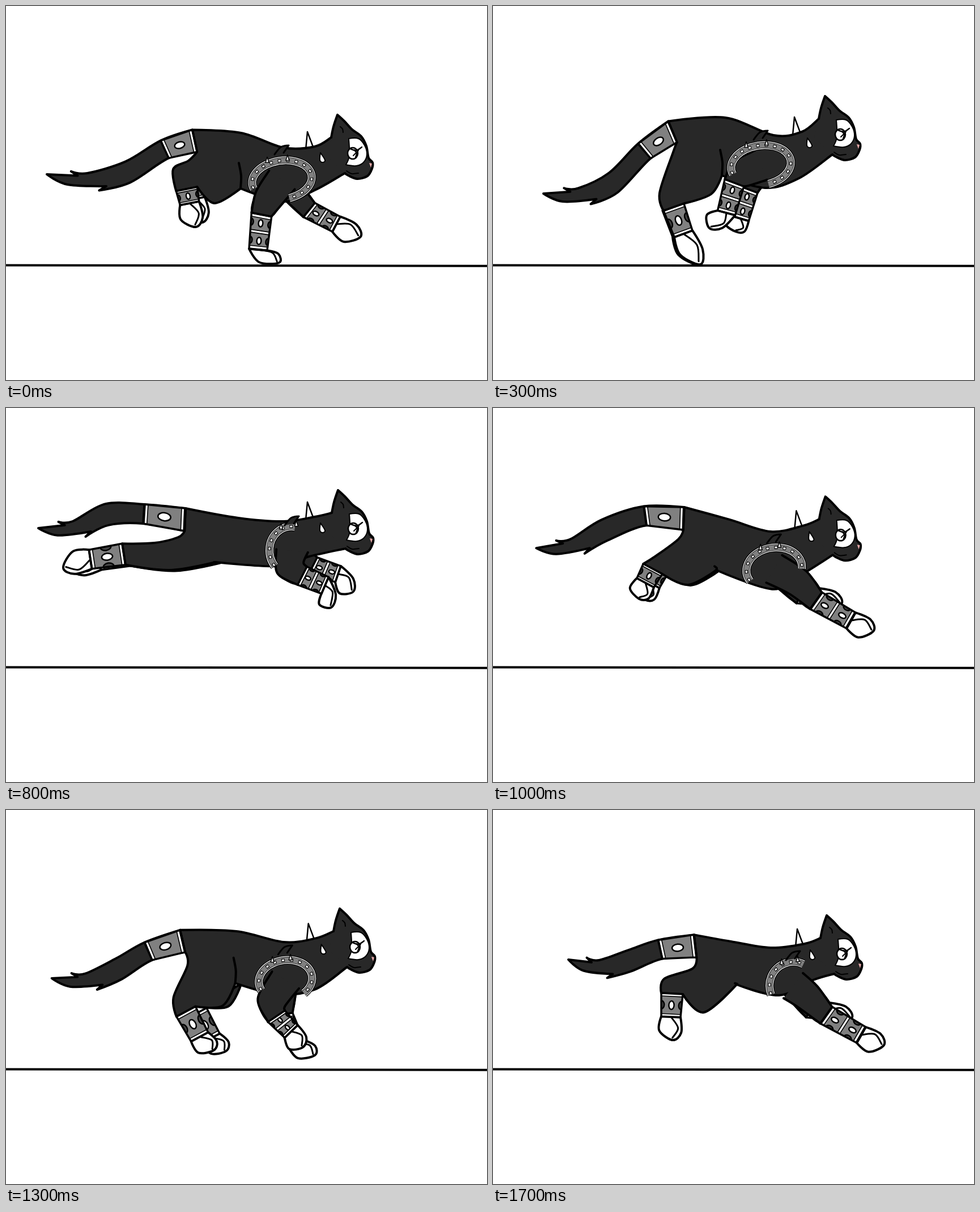
Recreate the animation shown at these times as an HTML page with a canvas. Size 849 px wide and 660 px high, loop 1.8 s.

```html
<!DOCTYPE html>
<html lang="en">
<head>
<meta charset="utf-8">
<title>Running cat</title>
<style>
html, body { margin: 0; height: 100%; overflow: hidden; background: #fff; }
canvas { display: block; }
</style>
</head>
<body>
<canvas id="stage" width="849" height="660"></canvas>
<script>
const ctx = document.getElementById('stage').getContext('2d');
const LOOP = 1800, STEP = 100;
const INK = '#000', FUR = '#282828', GREY = '#808080', WHITE = '#fff';

// Joints of each key pose; outlines grow from them.
// torso: neck, withers, loin, rump, thigh back and front, flank, belly, chest
// tail: root, cuff end, middle, tip; legs: (elbow,) cuff, ankle, toe
// gap: far hind leg from the near one; collar: centre, radii, start and end angle
const poses = [
  { t: 0, head: [0, 0], gap: [11, -8], collar: [487, 307, 53, 34, 2.9, 7.7],
    torso: [545,248, 490,250, 415,224, 322,273, 295,288, 368,348, 414,322, 490,345, 545,325],
    tail: [333,238, 280,253, 215,293, 72,297],
    nearHind: [319,323, 324,348, 335,390],
    nearFore: [463,340, 451,368, 445,430, 482,453],
    farFore: [535,360, 583,385, 626,407] },
  { t: 300, head: [1, -33], gap: [-4, 0], collar: [473, 281, 53, 35, 2.9, 7.7],
    torso: [545,222, 495,228, 410,197, 318,258, 294,330, 385,332, 404,299, 480,321, 540,304],
    tail: [317,222, 267,256, 212,312, 89,331],
    nearHind: [319,355, 336,402, 366,456],
    nearFore: [438,296, 426,312, 412,365, 382,392],
    farFore: [452,324, 437,375, 428,398] },
  { t: 600, head: [1, -42], gap: [-22, 0], collar: [495, 253, 46, 50, 2.2, 4.8],
    torso: [540,194, 490,204, 400,204, 287,262, 234,322, 325,338, 374,288, 478,295, 530,257],
    tail: [294,217, 240,233, 165,280, 40,314],
    nearHind: [241,351, 216,430, 256,454],
    nearFore: [486,270, 492,281, 528,294, 540,328],
    farFore: [519,273, 542,281, 549,296] },
  { t: 800, head: [1, -47], gap: [16, 3], collar: [505, 252, 40, 43, 2.6, 5],
    torso: [545,192, 490,200, 410,194, 304,228, 262,238, 290,286, 370,272, 478,279, 535,262],
    tail: [316,197, 243,187, 178,188, 57,212],
    nearHind: [208,258, 149,267, 101,282],
    nearFore: [502,282, 523,296, 563,313, 574,352],
    farFore: [542,278, 586,293, 613,324] },
  { t: 1100, head: [2, -30], gap: [8, 1], collar: [492, 300, 54, 35, 2.8, 7.2],
    torso: [550,215, 490,227, 420,198, 339,233, 301,272, 372,325, 406,293, 500,340, 546,312],
    tail: [347,194, 281,192, 207,229, 86,265],
    nearHind: [319,297, 329,329, 336,364],
    nearFore: [474,342, 482,384, 510,434, 546,452],
    farFore: [542,350, 596,372, 628,392] },
  { t: 1400, head: [5, -12], gap: [28, 2], collar: [494, 300, 44, 35, 2.8, 7.2],
    torso: [545,232, 490,236, 400,222, 311,295, 293,360, 387,356, 404,312, 470,318, 545,319],
    tail: [294,250, 236,278, 195,306, 78,313],
    nearHind: [317,385, 348,436, 382,454],
    nearFore: [466,338, 475,354, 500,369, 513,402],
    farFore: [464,366, 470,432, 504,453] },
  { t: 1700, head: [4, -6], gap: [0, 0], collar: [530, 310, 42, 42, 2.9, 5.3],
    torso: [550,236, 490,243, 420,232, 352,280, 302,298, 372,357, 430,308, 505,327, 565,300],
    tail: [357,240, 295,246, 241,266, 133,264],
    nearHind: [316,324, 314,365, 317,406],
    nearFore: [556,330, 588,362, 650,397, 690,415],
    farFore: [562,353, 592,355, 634,366] }
];

const pairs = list => list.flatMap((v, i) => i % 2 ? [] : [[v, list[i + 1]]]);
const add = (p, q) => [p[0] + q[0], p[1] + q[1]];
const mix = (p, q, k) => [p[0] + (q[0] - p[0]) * k, p[1] + (q[1] - p[1]) * k];
const shift = (list, d) => list.map((v, i) => v + d[i % 2]);

// The forelegs reach out once more before the second landing.
const reach = [-18, -22], last = poses[6];
poses.splice(4, 0, { t: 1000, nearFore: shift(last.nearFore, reach), farFore: shift(last.farFore, reach) });

const headLine = pairs([574,232, 578,213, 585,192, 597,203, 611,218, 627,230, 636,247, 640,268, 647,276, 646,287, 638,300, 620,305, 604,299, 598,295]);
const maskLine = pairs([605,234, 622,234, 633,246, 637,262, 631,276, 618,282, 600,280, 606,264]);
// Tufts at the tail end: fraction along middle-tip, offset upwards.
const tailEnd = [[.5, 0], [.7, 4], [.62, -4], [1, 0], [.75, -19], [.27, -24], [.36, -31]];

function sample(part, t) {
  const keys = poses.filter(p => p[part]);
  let i = keys.length - 1;
  while (keys[i].t > t) i--;
  const from = keys[i], to = keys[i + 1] || { ...keys[0], t: LOOP };
  const k = (t - from.t) / (to.t - from.t);
  return from[part].map((v, j) => v + (to[part][j] - v) * k);
}

function normal(p, q, w) {
  const dx = q[0] - p[0], dy = q[1] - p[1], k = w / (Math.hypot(dx, dy) || 1);
  return [-dy * k, dx * k];
}

const off = (p, q, k, w) => add(mix(p, q, k), normal(p, q, w));

// Both sides of a chain of joints with the given half widths.
function ribbon(chain, widths) {
  const side = sign => chain.map((p, i) =>
    add(p, normal(chain[Math.max(0, i - 1)], chain[i + 1] || p, sign * widths[i])));
  return [side(1), side(-1)];
}

function spline(pts, corners = [], closed = false) {
  const n = pts.length, path = new Path2D();
  const at = i => closed ? pts[(i + n) % n] : pts[Math.max(0, Math.min(n - 1, i))];
  const slope = i => corners.includes(i % n) ? [0, 0] : mix([0, 0], add(at(i + 1), at(i - 1).map(v => -v)), 1 / 6);
  path.moveTo(...pts[0]);
  for (let i = 0; i < (closed ? n : n - 1); i++) {
    const p = at(i), q = at(i + 1), b = slope(i + 1);
    path.bezierCurveTo(...add(p, slope(i)), q[0] - b[0], q[1] - b[1], ...q);
  }
  return path;
}

function poly(...pts) {
  const path = new Path2D();
  pts.forEach(p => path.lineTo(...p));
  path.closePath();
  return path;
}

function fill(path, color) {
  ctx.fillStyle = color;
  ctx.fill(path);
}

function line(path, width = 4, color = INK) {
  ctx.lineWidth = width;
  ctx.strokeStyle = color;
  ctx.stroke(path);
}

function shape(path, color, width = 4) {
  fill(path, color);
  line(path, width);
}

function oval([x, y], rx, ry, angle, color) {
  const path = new Path2D();
  path.ellipse(x, y, rx, ry, angle, 0, 7);
  shape(path, color, 2.5);
}

// Studded cuff between the edges a-b and c-d.
function cuff(a, b, c, d, count, sideStuds) {
  const quad = poly(a, b, d, c);
  const start = mix(a, b, .5), end = mix(c, d, .5);
  const dx = end[0] - start[0], dy = end[1] - start[1];
  const size = Math.hypot(dx, dy) / count * .12 + 2.5, angle = Math.atan2(dy, dx);
  fill(quad, GREY);
  ctx.save();
  ctx.clip(quad);
  for (let i = 0; i < count; i++) {
    const k = (i + .5) / count, left = mix(a, c, k), right = mix(b, d, k);
    oval(mix(left, right, .5), size, size * .62, angle, WHITE);
    if (sideStuds) [left, right].forEach(p => oval(p, size, size * .7, angle, '#444'));
  }
  for (let i = 0; i <= count; i++) {
    const k = .06 + .88 * i / count, stripe = poly(mix(a, c, k), mix(b, d, k));
    line(stripe, 6.5);
    line(stripe, 3.2, WHITE);
  }
  ctx.restore();
  line(quad, 3.5);
}

// A leg ends in cuff and ankle; earlier joints form the furry upper part.
function leg(chain, toe, widths, cuffs) {
  const [left, right] = ribbon(chain, widths), n = chain.length;
  const [[a, c], [b, d]] = [left.slice(-2), right.slice(-2)];
  if (n > 2) {
    const back = left.slice(0, -1), front = right.slice(0, -1);
    fill(spline([...back, ...front.reverse()]), FUR);
    line(spline(back));
    line(spline(front));
  }
  const top = off(d, toe, .6, -10);
  shape(spline([c, off(c, toe, .45, 14), toe, top, d], [0, 4], true), WHITE);
  line(spline([chain[n - 1], mix(chain[n - 1], top, .7), mix(chain[n - 1], toe, .9)]), 3);
  cuff(a, b, c, d, cuffs, true);
}

function drawCollar([x, y, rx, ry, from, to]) {
  const path = new Path2D();
  path.ellipse(x, y, rx, ry, -.15, from, to);
  ctx.lineCap = 'butt';
  line(path, 16);
  line(path, 13.5, WHITE);
  line(path, 11);
  line(path, 9.5, GREY);
  ctx.setLineDash([6, 9]);
  line(path, 5.5);
  ctx.setLineDash([4, 11]);
  ctx.lineDashOffset = -1;
  line(path, 3, WHITE);
  ctx.setLineDash([]);
  ctx.lineDashOffset = 0;
  ctx.lineCap = 'round';
  for (const angle of [4.2, 4.9]) {
    const u = x + rx * Math.cos(angle), v = y + ry * Math.sin(angle);
    shape(poly([u - 3, v - 1], [u, v - 11], [u + 3, v - 1]), WHITE, 1.5);
  }
}

function drawHead(offset) {
  ctx.save();
  ctx.translate(...offset);
  fill(spline([...headLine, [566, 265]], [2, 14], true), FUR);
  line(spline(headLine, [2]));
  shape(spline(maskLine, [0, 6], true), WHITE, 2);
  oval([612, 260], 9, 10, 0, WHITE);
  line(spline([[608, 252], [618, 255], [628, 249]]), 2.5);
  line(spline([[615, 254], [619, 260], [617, 267]]), 2.5);
  line(spline([[622, 255], [617, 260], [613, 264]]), 2);
  line(spline([[590, 213], [594, 217], [595, 223]]), 2);
  line(spline([[601, 291], [610, 296], [622, 295]]), 2);
  fill(poly([641, 277], [646, 278], [644, 285]), '#e9a9a9');
  ctx.restore();
}

function drawFloor() {
  ctx.fillStyle = WHITE;
  ctx.fillRect(0, 458, 849, 202);
  line(poly([-5, 457.4], [854, 458.8]));
}

function draw(t) {
  const flat = part => sample(part, t), joints = part => pairs(flat(part));
  ctx.fillStyle = WHITE;
  ctx.fillRect(0, 0, 849, 660);
  ctx.lineJoin = ctx.lineCap = 'round';

  const head = flat('head'), gap = flat('gap'), collar = flat('collar');
  const [neck, withers, loin, rump, thighBack, thighFront, flank, belly, chest] = joints('torso');
  const tail = joints('tail'), [, , middle, tip] = tail;
  const [hock, ankle, toe] = joints('nearHind');
  const [elbow, wrist, palm, finger] = joints('nearFore');
  const [farWrist, farPalm, farFinger] = joints('farFore');
  const shoulder = collar.slice(0, 2);

  const [[, topRoot, topCuff, topMiddle], [, lowRoot, lowCuff, lowMiddle]] =
    ribbon([loin, ...tail], [0, 20, 17, 19, 0]);
  const [[hockBack], [hockFront]] = ribbon([hock, ankle], [19, 17]);
  const torso = [add(headLine[0], head), neck, withers, loin, topRoot, lowRoot, rump, thighBack,
    hockBack, hockFront, thighFront, flank, belly, chest, add(headLine.at(-1), head)];
  const tailLine = [topRoot, topCuff, topMiddle, ...tailEnd.map(([k, w]) => off(middle, tip, k, w)),
    lowMiddle, lowCuff, lowRoot];

  leg([shoulder, farWrist, farPalm], farFinger, [22, 16, 15], 2);
  shape(spline([hockFront, thighFront, flank].map(p => add(p, mix([0, 0], gap, .5))), [0, 2], true), FUR);
  leg([add(hock, gap), add(ankle, gap)], add(toe, gap), [17, 16], 1);

  const spike = add(neck, [-13, -26]);
  shape(poly(spike, add(spike, [-3, 32]), add(spike, [12, 32])), WHITE, 2.5);
  shape(spline(torso, [4, 5, 8, 9, 11]), FUR);
  // The thigh crease fades as the hind leg stretches back.
  const crease = 45 * Math.max(0, Math.min(1, (115 - flank[0] + hock[0]) / 20));
  line(spline([add(flank, [-3, -crease]), add(flank, [1, -crease / 2]), flank]));

  shape(spline(tailLine, [0, 4, 5, 6, 8, 9, 12], true), FUR);
  cuff(topCuff, lowCuff, topRoot, lowRoot, 1, false);
  leg([hock, ankle], toe, [19, 17], 1);
  leg([shoulder, elbow, wrist, palm], finger, [28, 25, 18, 16], 2);
  drawCollar(collar);
  drawHead(head);

  const tuft = add(shoulder, [12, -61]);
  shape(spline([add(tuft, [-25, 16]), add(tuft, [-14, 3]), tuft, add(tuft, [-9, 13])], [2]), FUR, 3);
  const drop = add(neck, [13, 20]);
  shape(spline([[-3, -9], [5, 4], [1, 8], [-4, 4]].map(p => add(drop, p)), [0], true), WHITE, 2);
  drawFloor();
}

function tick() {
  draw(Math.floor(performance.now() % LOOP / STEP) * STEP);
  requestAnimationFrame(tick);
}
tick();
</script>
</body>
</html>
```
